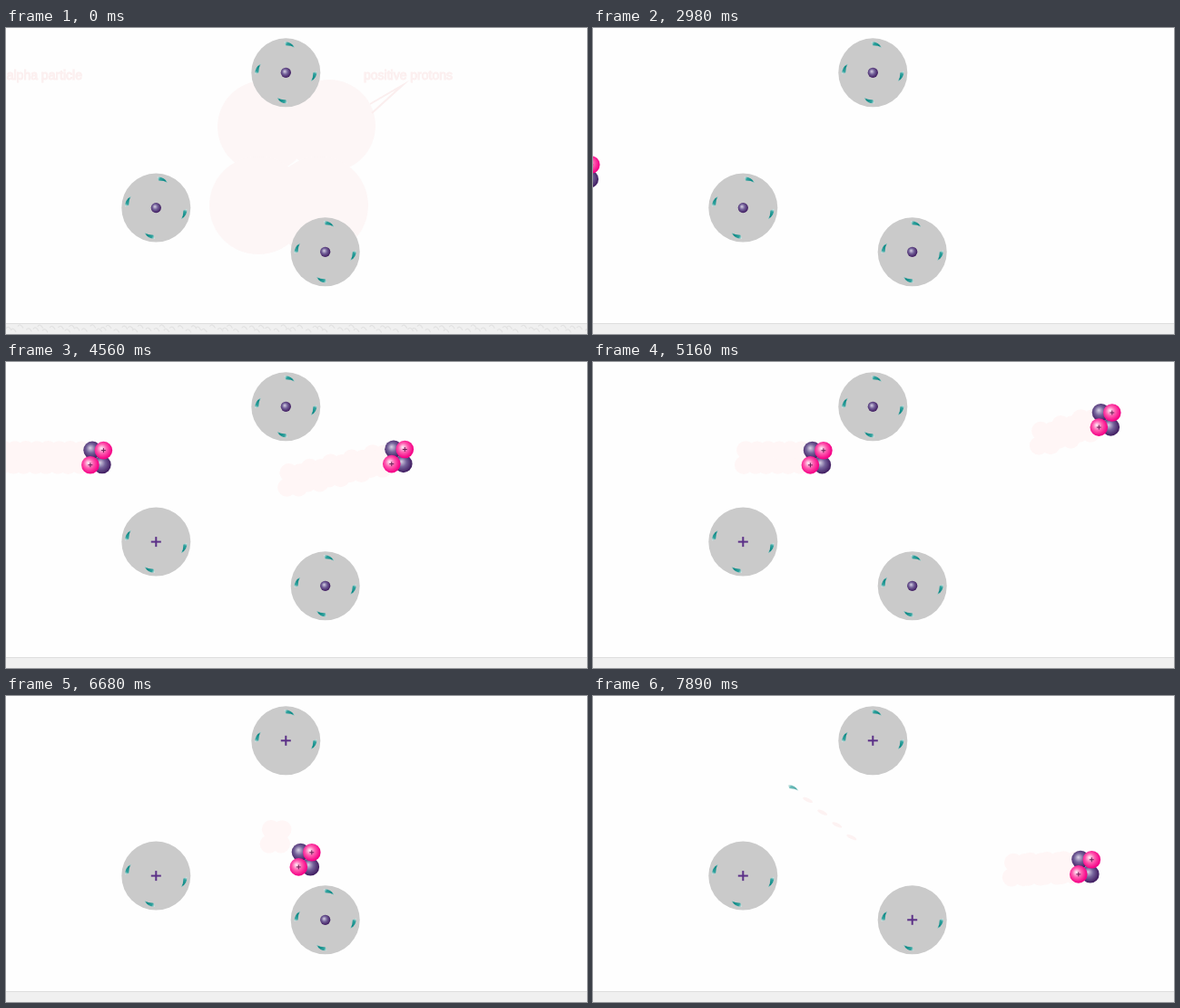
Recreate the animation shown at these times as an HTML page with a canvas. Size 640 px wide and 338 px high, loop 8000 ms.

```html
<!DOCTYPE html>
<html lang="en">
<head>
<meta charset="utf-8">
<title>Ionisation by alpha particles</title>
<style>
html, body { margin: 0; width: 100%; height: 100%; overflow: hidden; background: #fefefe; }
canvas { display: block; }
</style>
</head>
<body>
<canvas id="stage" width="640" height="338"></canvas>
<script>
const ctx = document.getElementById('stage').getContext('2d');
const LOOP = 8000, TAU = Math.PI * 2;
const GHOST = '#fff6f6';
const PURPLE = ['#d8d2e4', '#74629a', '#432064'];
const PINK = ['#fff0f8', '#ff5db0', '#f50086'];

// Each atom loses one electron (slot 0 = top, then clockwise) at step `start`.
const atoms = [
  { x: 308.3, y: 49.3, off: [4, -31], slot: 2, start: 21, end: 29, v: [24, -1.5] },
  { x: 165.3, y: 198.6, off: [7, -31], slot: 0, start: 3, end: 9, v: [-15.8, -24.4] },
  { x: 351.7, y: 247.3, off: [4, -31], slot: 0, start: 37.6, end: 99, v: [-16.1, -13.7] }
];

// Alpha particle paths: [step, x, y].
const paths = [
  [[0, -9.5, 158.5], [9, 293.5, 135.2], [15, 432, 104], [21, 564.5, 63.5], [23, 606, 49.5]],
  [[10, -22, 105], [22.9, 293, 105.3], [29, 509.5, 171.3]],
  [[26, 36, 92], [29, 150.7, 111], [32.5, 264, 130], [34, 297, 155],
   [35, 329.5, 180.3], [35.7, 352, 197], [46, 542, 188.3]]
];

// The motion advances in held steps of 100 or 110 ms.
function stepAt(t) {
  const count = (from, ms) => Math.floor((t - from) / ms);
  if (t < 2980) return -1;
  if (t < 3790) return Math.min(7, count(2980, 100));
  if (t < 4660) return 8 + count(3790, 110);
  if (t < 5470) return 16 + Math.min(7, count(4660, 100));
  return 24 + count(5470, 110);
}

function along(path, n) {
  let i = 0;
  while (i < path.length - 2 && n > path[i + 1][0]) i++;
  const [a, b] = [path[i], path[i + 1]];
  const k = (n - a[0]) / (b[0] - a[0]);
  return [a[1] + (b[1] - a[1]) * k, a[2] + (b[2] - a[2]) * k];
}

function disc(x, y, r, fill) {
  ctx.fillStyle = fill;
  ctx.beginPath();
  ctx.arc(x, y, r, 0, TAU);
  ctx.fill();
}

function ball(x, y, r, [light, mid, dark]) {
  const g = ctx.createRadialGradient(x - r * .25, y - r * .25, 0, x - r * .1, y - r * .1, r * 1.05);
  g.addColorStop(0, light);
  g.addColorStop(.5, mid);
  g.addColorStop(1, dark);
  disc(x, y, r, g);
}

function plus(x, y, size, width, color) {
  ctx.fillStyle = color;
  ctx.fillRect(x - size / 2, y - width / 2, size, width);
  ctx.fillRect(x - width / 2, y - size / 2, width, size);
}

function alpha(x, y, ghost) {
  const parts = [[-5, -7.8, PURPLE], [5.8, 8.4, PURPLE], [7.3, -7.5, PINK], [-7.2, 8.6, PINK]];
  for (const [dx, dy, colors] of parts) {
    if (ghost) disc(x + dx, y + dy, 10.2, GHOST);
    else ball(x + dx, y + dy, 9.8, colors);
    if (!ghost && colors === PINK) plus(x + dx, y + dy, 5, 1, '#6b1d55');
  }
}

function electron(x, y, angle) {
  ctx.save();
  ctx.translate(x, y);
  ctx.rotate(angle);
  const g = ctx.createLinearGradient(-6, 0, 7, 0);
  g.addColorStop(0, '#dcebea');
  g.addColorStop(.25, '#2fa19d');
  g.addColorStop(.7, '#0d8985');
  g.addColorStop(1, '#b9dddb');
  ctx.fillStyle = g;
  ctx.beginPath();
  ctx.moveTo(-6.5, -.5);
  ctx.quadraticCurveTo(0, -4, 7, 1);
  ctx.lineTo(2, .8);
  ctx.lineTo(-3.5, 2.4);
  ctx.closePath();
  ctx.fill();
  ctx.restore();
}

function slotPlace(atom, slot) {
  let [x, y] = atom.off;
  for (let i = 0; i < slot; i++) [x, y] = [-y, x];
  return [atom.x + x, atom.y + y];
}

function freePlace(atom, n) {
  const [x, y] = slotPlace(atom, atom.slot);
  const k = Math.max(0, n - atom.start);
  return [x + atom.v[0] * k, y + atom.v[1] * k];
}

// Pale remains of the labelled diagram shown before the atoms.
function diagram(opacity) {
  ctx.save();
  ctx.globalAlpha = opacity;
  for (const [x, y, r] of [[284, 109, 51], [356, 108, 51], [278, 196, 54], [345, 196, 54]])
    disc(x, y, r, '#fdf6f6');
  ctx.fillStyle = '#fcf0f0';
  ctx.strokeStyle = '#fbeeee';
  ctx.lineWidth = 1;
  ctx.font = '14px "Liberation Sans", Arial, sans-serif';
  ctx.textAlign = 'right';
  for (const [label, x] of [['alpha particle', 84], ['positive protons', 492]]) {
    ctx.strokeText(label, x, 57);
    ctx.fillText(label, x, 57);
  }
  ctx.lineWidth = 2;
  ctx.beginPath();
  ctx.moveTo(401, 84);
  ctx.lineTo(437, 63);
  ctx.lineTo(403, 94);
  ctx.stroke();
  ctx.strokeStyle = '#e3e3e3';
  ctx.lineWidth = 1.3;
  ctx.beginPath();
  for (let i = 0; i < 92; i++) {
    const x = i * 7 + Math.sin(i * 5) * 2, y = 332 + Math.sin(i * 2.3) * 2.5;
    ctx.moveTo(x, y);
    ctx.quadraticCurveTo(x + 3, y - 4, x + 6, y + 2);
  }
  ctx.stroke();
  ctx.restore();
}

function trails(n) {
  // Traces collect until they are wiped, every eight steps.
  const first = Math.max(0, Math.floor((n - 2) / 8) * 8 + 2);
  for (let k = first; k < n; k++) {
    for (const path of paths) alpha(...along(path, k), true);
    for (const atom of atoms) {
      if (k <= atom.start + 1 || k >= atom.end) continue;
      const [x, y] = freePlace(atom, k);
      ctx.fillStyle = '#fdf2f2';
      ctx.beginPath();
      ctx.ellipse(x, y, 6, 2, .45, 0, TAU);
      ctx.fill();
    }
  }
}

function draw(t) {
  const n = stepAt(t);
  ctx.fillStyle = '#fefefe';
  ctx.fillRect(0, 0, 640, 338);
  ctx.fillStyle = '#f0f0f0';
  ctx.fillRect(0, 326, 640, 12);
  ctx.fillStyle = '#dedede';
  ctx.fillRect(0, 326, 640, 1);
  if (t < 960) diagram(t < 640 ? 1 : .8 - Math.floor((t - 640) / 80) * .2);
  if (n >= 0) trails(n);

  for (const atom of atoms) {
    disc(atom.x, atom.y, 38, '#cacaca');
    const hit = n > atom.start;
    if (hit) plus(atom.x, atom.y, 11, 2, '#5c3188');
    else ball(atom.x, atom.y, 5.6, PURPLE);
    for (let s = 0; s < 4; s++)
      if (!hit || s !== atom.slot) electron(...slotPlace(atom, s), .4 + s * Math.PI / 2);
  }
  for (const atom of atoms) {
    if (n <= atom.start || n >= atom.end) continue;
    ctx.globalAlpha = n > 45 ? .7 : 1;
    electron(...freePlace(atom, n), .4);
    ctx.globalAlpha = 1;
  }
  if (n >= 0) for (const path of paths) alpha(...along(path, n));
}

const begin = performance.now();
function tick() {
  draw((performance.now() - begin) % LOOP);
  requestAnimationFrame(tick);
}
tick();
</script>
</body>
</html>
```
